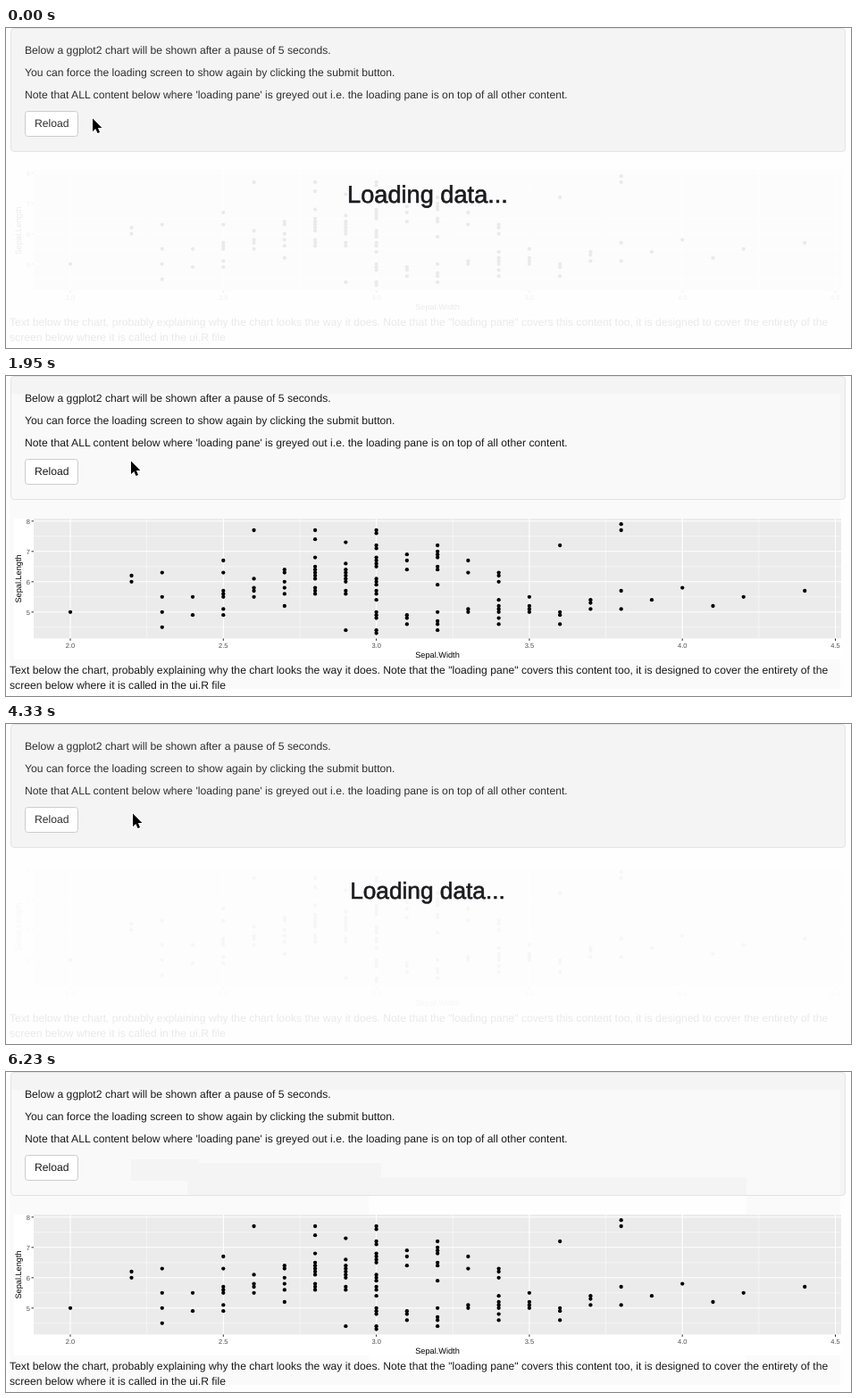
An HTML page for the animation above (7.28 s loop, 946 by 359 pixels).

```html
<!DOCTYPE html>
<html lang="en">
<head>
<meta charset="utf-8">
<title>Loading pane</title>
<style>
  html, body { margin: 0; width: 100%; height: 100%; overflow: hidden; background: #fefefe; }
  svg { display: block; width: 946px; height: 359px; }
  text { font-family: "Liberation Sans", Arial, sans-serif; text-rendering: geometricPrecision; white-space: pre; }
  .copy { font-size: 12.17px; fill: #1a1a1a; }
  .loading .copy { fill: #303030; }
  .tick { font-size: 7.5px; fill: #4d4d4d; }
  .axis { font-size: 9.2px; fill: #000; text-anchor: middle; }
  #title { font-size: 26px; fill: #1b1b1f; stroke: #1b1b1f; stroke-width: .6; text-anchor: middle; }
  #button { fill: #fff; stroke: #ccc; }
  #button.hover { fill: #e6e6e6; stroke: #adadad; }
  #overlay, .loading #settled { display: none; }
  .loading #overlay { display: inline; }
</style>
</head>
<body>
<svg id="stage" viewBox="0 0 946 359">
  <rect width="946" height="359" fill="#fefefe"/>
  <rect x="5.5" y=".5" width="934" height="138" rx="3.5" fill="#f4f4f4"/>
  <g id="settled">
    <rect x="5" y="20" width="929" height="118" fill="#f9f9f9"/>
    <rect x="4" y="139" width="930" height="212" fill="#fafafa"/>
    <g id="trail"></g>
  </g>
  <rect x="5.5" y=".5" width="934" height="138" rx="3.5" fill="none" stroke="#e3e3e3"/>
  <text class="copy" x="21" y="29">Below a ggplot2 chart will be shown after a pause of 5 seconds.</text>
  <text class="copy" x="21" y="54">You can force the loading screen to show again by clicking the submit button.</text>
  <text class="copy" x="21" y="79">Note that ALL content below where 'loading pane' is greyed out i.e. the loading pane is on top of all other content.</text>
  <rect id="button" x="21.5" y="93.5" width="59" height="28" rx="3"/>
  <text class="copy" x="32" y="111">Reload</text>
  <g id="chart"></g>
  <text class="copy" x="4" y="334">Text below the chart, probably explaining why the chart looks the way it does. Note that the "loading pane" covers this content too, it is designed to cover the entirety of the</text>
  <text class="copy" x="4" y="351">screen below where it is called in the ui.R file</text>
  <g id="overlay">
    <rect y="139" width="946" height="220" fill="#fefefe" opacity=".9"/>
    <text id="title" x="472" y="195.6">Loading data...</text>
  </g>
  <g id="cursor">
    <path id="arrow" d="M0 0V14.5L3.3 11.4 5.5 16.6 8 15.5 5.9 10.5H10.4Z" stroke="#fff" paint-order="stroke" stroke-width="1.6"/>
    <path id="hand" d="M-1.6 10V1.4a1.6 1.6 0 0 1 3.2 0V6q2.2-1.2 3 .4 2-.6 2.7.9 2.2-.2 2.2 1.8V12q-.2 2-1.8 3.2V17H0q-1-2.5-3-4.5-2-2.2-1.6-3 1.2-1 3 .8Z" fill="#fff" stroke="#000" stroke-width="1.2"/>
  </g>
</svg>
<script>
const LOOP = 7280;
const $ = id => document.getElementById(id);

function add(parent, tag, attrs, text) {
  const node = document.createElementNS('http://www.w3.org/2000/svg', tag);
  for (const key in attrs) node.setAttribute(key, attrs[key]);
  if (text) node.textContent = text;
  parent.append(node);
  return node;
}

// Iris sepal lengths grouped by sepal width, both in tenths
const iris = {
  20: [50], 22: [60, 62], 23: [45, 50, 55, 63], 24: [49, 55],
  25: [49, 51, 55, 56, 57, 63, 67], 26: [55, 57, 58, 61, 77],
  27: [52, 56, 58, 60, 63, 64],
  28: [56, 57, 58, 61, 62, 63, 64, 65, 68, 74, 77],
  29: [44, 56, 57, 60, 61, 62, 63, 64, 66, 73],
  30: [43, 44, 48, 49, 50, 54, 56, 57, 59, 60, 61, 65, 66, 67, 68, 71, 72, 76, 77],
  31: [46, 48, 49, 64, 67, 69],
  32: [44, 46, 47, 50, 59, 64, 65, 68, 69, 70, 72],
  33: [50, 51, 63, 67], 34: [46, 48, 50, 51, 52, 54, 60, 62, 63],
  35: [50, 51, 52, 55], 36: [46, 49, 50, 72], 37: [51, 53, 54],
  38: [51, 57, 77, 79], 39: [54], 40: [58], 41: [52], 42: [55], 44: [57]
};

function buildChart() {
  const chart = $('chart');
  const px = width => 72 + (width - 20) * 34.26;
  const py = length => 264.8 - (length - 50) * 3.4;
  const line = (d, stroke, width) => add(chart, 'path', { d, stroke, 'stroke-width': width });
  add(chart, 'rect', { x: 9, y: 160, width: 926, height: 158, fill: '#fff' });
  add(chart, 'rect', { x: 31, y: 160, width: 904, height: 134.5, fill: '#ebebeb' });

  for (let w = 22.5; w < 45; w += 5) line(`M${px(w)} 160V294.5`, '#fff', .5);
  for (let l = 45; l < 80; l += 10) line(`M31 ${py(l)}H935`, '#fff', .5);
  for (let w = 20; w <= 45; w += 5) {
    line(`M${px(w)} 160V294.5`, '#fff', 1.1);
    line(`M${px(w)} 294.5v2.5`, '#333', 1);
    add(chart, 'text', { class: 'tick', x: px(w), y: 304.5, 'text-anchor': 'middle' }, (w / 10).toFixed(1));
  }
  for (let l = 50; l <= 80; l += 10) {
    line(`M31 ${py(l)}H935`, '#fff', 1.1);
    line(`M28.5 ${py(l)}h2.5`, '#333', 1);
    add(chart, 'text', { class: 'tick', x: 27, y: py(l) + 2.7, 'text-anchor': 'end' }, String(l / 10));
  }
  for (const w in iris)
    for (const l of iris[w]) add(chart, 'circle', { cx: px(w), cy: py(l), r: 2.15 });
  add(chart, 'text', { class: 'axis', x: 483, y: 316 }, 'Sepal.Width');
  add(chart, 'text', { class: 'axis', transform: 'translate(16.5 227.5) rotate(-90)' }, 'Sepal.Length');
}

// Repainted areas left behind the pointer: time, x, y, width, height, fill
const trail = [
  [5790, 140, 98, 76, 24, '#f4f4f4'],
  [5930, 203, 102, 217, 36, '#f4f4f4'],
  [6080, 406, 118, 423, 20, '#f4f4f4'],
  [6080, 406, 139, 423, 194, '#fefefe']
].map(([time, x, y, width, height, fill]) =>
  ({ time, node: add($('trail'), 'rect', { x, y, width, height, fill }) }));

// Pointer stops: time, x, y
const stops = [
  [0, 97, 101.5], [150, 118, 97], [300, 135, 95], [450, 140, 95.5],
  [2700, 128, 97], [2850, 100, 102], [3000, 74, 103], [3150, 67, 101.5],
  [3440, 72, 103], [3590, 112, 104], [3740, 142, 100.5],
  [5790, 205, 103], [5930, 407, 120], [6080, 817, 315], [6230, -50, -50]
];

// The CSS "ease" curve
function ease(x) {
  const bezier = (p, a, b) => 3 * (1 - p) ** 2 * p * a + 3 * (1 - p) * p * p * b + p ** 3;
  let low = 0, high = 1;
  for (let i = 0; i < 16; i++) {
    const mid = (low + high) / 2;
    if (bezier(mid, .25, .25) < x) low = mid; else high = mid;
  }
  return bezier(low, .1, 1);
}

const clamp = v => Math.min(1, Math.max(0, v));

const tick = t => t < 3300
  ? Math.floor(t / 150) * 150
  : 3300 + Math.floor((t - 3300 + 7) / 146.6) * 146.6;

function draw(now) {
  const t = tick(now % LOOP);
  const second = t >= 3250;
  const start = second ? 3250 : -550;
  const loading = t < (second ? 5150 : 1600);
  const ready = t >= (second ? 5450 : 1900);
  $('stage').classList.toggle('loading', loading);

  $('chart').setAttribute('opacity', ready ? 1 : 1 - .7 * ease(clamp((t - start - 500) / 250)));

  const phase = (t - start) % 1000 / 500;
  const pulse = phase < 1 ? ease(phase) : 1 - ease(phase - 1);
  $('title').setAttribute('transform', `translate(472 187) scale(${1 + .05 * pulse}) translate(-472 -187)`);

  const [, x, y] = stops.filter(stop => stop[0] <= t + 8).pop();
  const hover = x > 21 && x < 81 && y > 93 && y < 122;
  $('cursor').setAttribute('transform', `translate(${x} ${y})`);
  $('arrow').style.display = hover ? 'none' : '';
  $('hand').style.display = hover ? '' : 'none';
  $('button').classList.toggle('hover', hover);

  for (const { time, node } of trail) node.style.display = t + 8 >= time ? '' : 'none';
}

buildChart();
draw(0);
const begin = performance.now();
(function loop() {
  draw(performance.now() - begin);
  requestAnimationFrame(loop);
})();
</script>
</body>
</html>
```
